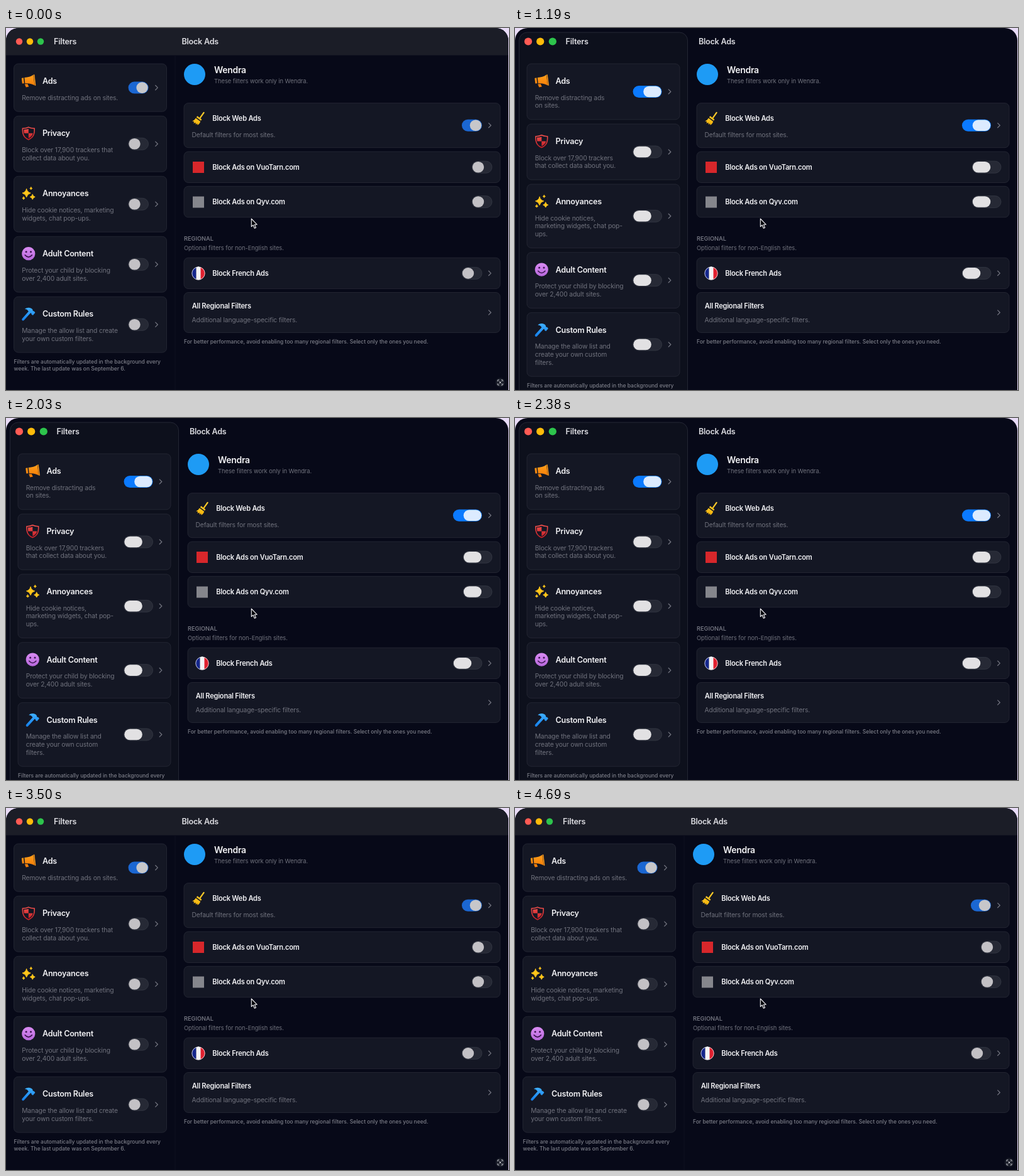
Recreate the animation shown at these times as an HTML page with a canvas. Size 800x577 px, loop 4760 ms.

```html
<!DOCTYPE html>
<html lang="en">
<head>
<meta charset="utf-8">
<title>Filters</title>
<style>
  html, body { margin: 0; width: 100%; height: 100%; overflow: hidden; background: #e9dcf8; }
  canvas { display: block; width: 800px; height: 577px; }
</style>
</head>
<body>
<canvas id="stage"></canvas>
<script>
const W = 800, H = 577, LOOP = 4760, NEW_FROM = 420, NEW_TO = 2800;
const canvas = document.getElementById('stage');
const ratio = window.devicePixelRatio || 1;
canvas.width = W * ratio;
canvas.height = H * ratio;
const ctx = canvas.getContext('2d');

// size, weight, letter spacing, colour
const STYLE = {
  title: [12.6, 600, -0.25, '#f0f0f3'],
  row: [11.1, 600, -0.25, '#f0f0f3'],
  app: [14, 600, -0.3, '#f0f0f3'],
  desc: [10.3, 400, -0.14, '#70727d'],
  small: [9.4, 400, -0.06, '#70727d'],
  note: [8.5, 500, 0, '#7c7e88'],
  label: [9.2, 600, 0, '#70727d']
};

// The same window in its older and its newer look
const OLD = {
  bg: '#070918', lights: [21, 38, 55], lightR: 5.2, filters: 76, heading: 279.5, headText: '#dcdce1',
  side: 12.5, main: 283, toggleW: 32, knobW: 18.4, sideToggle: 226.5,
  on: '#1b67d2', onKnob: '#c7c7ca', offKnob: '#c3c1c5',
  texts: [
    ['Remove distracting ads on sites.'],
    ['Block over 17,900 trackers that', 'collect data about you.'],
    ['Hide cookie notices, marketing', 'widgets, chat pop-ups.'],
    ['Protect your child by blocking', 'over 2,400 adult sites.'],
    ['Manage the allow list and create', 'your own custom filters.']
  ]
};
const NEW = {
  bg: '#070918', lights: [21, 40.2, 59.8], lightR: 6.1, filters: 80.5, heading: 292, headText: '#dcdce1',
  side: 19, main: 289, toggleW: 46, knobW: 28.5, sideToggle: 233.5,
  on: '#0b7aff', onKnob: '#dcebff', offKnob: '#e2e1e3',
  texts: [
    ['Remove distracting ads', 'on sites.'],
    ['Block over 17,900 trackers', 'that collect data about you.'],
    ['Hide cookie notices,', 'marketing widgets, chat pop-', 'ups.'],
    ['Protect your child by blocking', 'over 2,400 adult sites.'],
    ['Manage the allow list and', 'create your own custom', 'filters.']
  ]
};

function text(str, x, cy, style, color) {
  const [size, weight, spacing, ink] = STYLE[style];
  ctx.font = `${weight} ${size}px Inter, "Liberation Sans", sans-serif`;
  ctx.letterSpacing = spacing + 'px';
  ctx.fillStyle = color || ink;
  ctx.fillText(str, x, cy + size * 0.36);
}

function box(x, y, w, h, r, fill, stroke) {
  ctx.beginPath();
  ctx.roundRect(x, y, w, h, r);
  if (fill) { ctx.fillStyle = fill; ctx.fill(); }
  if (stroke) { ctx.strokeStyle = stroke; ctx.lineWidth = 0.8; ctx.stroke(); }
}

function disc(x, y, r, fill) {
  ctx.beginPath();
  ctx.arc(x, y, r, 0, Math.PI * 2);
  ctx.fillStyle = fill;
  ctx.fill();
}

function shape(d, fill, stroke, width = 1) {
  const path = new Path2D(d);
  if (fill) { ctx.fillStyle = fill; ctx.fill(path); }
  if (stroke) { ctx.strokeStyle = stroke; ctx.lineWidth = width; ctx.stroke(path); }
}

function at(x, y, draw) {
  ctx.save();
  ctx.translate(x, y);
  ctx.lineCap = ctx.lineJoin = 'round';
  draw();
  ctx.restore();
}

function shade(from, to) {
  const g = ctx.createLinearGradient(0, -10, 0, 10);
  g.addColorStop(0, from);
  g.addColorStop(1, to);
  return g;
}

const card = (x, y, w, h) => box(x, y, w, h, 7, '#141724', '#272a37');

function toggle(look, right, cy, on) {
  const w = look.toggleW, k = look.knobW, h = 19;
  const x = right - w;
  box(x, cy - h / 2, w, h, h / 2, on ? look.on : '#262935', on ? null : '#373a46');
  box(on ? right - k - 0.8 : x + 0.8, cy - 8.8, k, 17.6, 8.8, on ? look.onKnob : look.offKnob);
}

function chevron(x, cy) {
  at(x, cy, () => shape('M-1.8 -3.6L1.8 0L-1.8 3.6', null, '#70727d', 1.3));
}

function megaphone() {
  const c = shade('#ffa01c', '#f27805');
  shape('M-11 -4.5L-8 -5.2L-7 3.8L-10 4.2Z', c);
  shape('M-6.5 -5.5C-1 -5.8 4 -7 7.5 -10L9.8 7.2C6 4.8 1 3.5 -5.5 4Z', c);
  shape('M-6 5.2L-1.5 4.9L0.5 9.2L-4 10Z', c);
  shape('M8.8 -9.6L10.8 6.8', null, '#ff9a18', 1.5);
}

function shield() {
  const c = shade('#f0504c', '#c91f27');
  shape('M0 -7.2V0H-7.1C-7.4 -2 -7.4 -4 -7.3 -5.8C-4.5 -5.8 -2 -6.2 0 -7.2Z', c);
  shape('M0 0H7C6.2 3.8 3.5 6.3 0 8Z', c);
  shape('M0 -9.6C3 -8 6 -7.6 9.4 -7.7C9.8 1.5 7.6 7 0 10.2C-7.6 7 -9.8 1.5 -9.4 -7.7C-6 -7.6 -3 -8 0 -9.6Z', null, c, 1.6);
}

function star(x, y, r) {
  const q = r * 0.2;
  at(x, y, () => shape(
    `M0 ${-r}Q${q} ${-q} ${r} 0Q${q} ${q} 0 ${r}Q${-q} ${q} ${-r} 0Q${-q} ${-q} 0 ${-r}Z`,
    '#ffc61a', '#ffc61a', 1));
}

function sparkles() {
  star(-3.2, -0.6, 6.6);
  star(6.4, 5.6, 4);
  star(-7.8, 7.6, 2.1);
  star(4, -8, 2);
}

function smiley() {
  disc(0, 0, 10.6, shade('#d88af2', '#b869dc'));
  disc(-3.7, -3, 1.5, '#3b1550');
  disc(3.7, -3, 1.5, '#3b1550');
  shape('M-5.6 2.2Q0 8.6 5.6 2.2', null, '#3b1550', 1.6);
}

function hammer() {
  const c = shade('#3fb0ff', '#1580ea');
  shape('M-8.6 8.8L2 -3', null, c, 4);
  shape('M-6 -7.6C-2 -11 3.2 -10.8 6.4 -7.2L7 -4.6L9 -4.2L10.6 -2L7 2.2L4.8 0.8L4.4 -1.2L2 -1.8L-0.6 -4.8C-1.6 -6.6 -3.4 -7.4 -6 -7.6Z', c);
}

function broom() {
  const c = shade('#ffcf2e', '#f5b40c');
  shape('M8.6 -9.6L2.8 -1.4', null, c, 2.2);
  shape('M-1.6 -4.2L5.4 1.2L4 3.2L-3.2 -2.3Z', c);
  shape('M-4.2 -1L3.2 4.6C2.4 7.4 0.8 9.2 -1.4 10.2L-2 7.4L-4 9.4L-4.6 6.2L-7.4 7.6L-7 4.6L-9.8 4.2C-7.4 2.8 -5.4 1.2 -4.2 -1Z', c);
}

function flag() {
  ctx.save();
  ctx.beginPath();
  ctx.arc(0, 0, 10.5, 0, Math.PI * 2);
  ctx.clip();
  ['#14268c', '#f4f4f6', '#e0202f'].forEach((c, i) => {
    ctx.fillStyle = c;
    ctx.fillRect([-11, -3.5, 3.5][i], -11, 7.5, 22);
  });
  ctx.restore();
  box(-10.2, -10.2, 20.4, 20.4, 10.2, null, '#f4f4f6');
}

const square = (r, c) => () => { ctx.fillStyle = c; ctx.fillRect(-r, -r, 2 * r, 2 * r); };

const TOPICS = [
  ['Ads', megaphone], ['Privacy', shield], ['Annoyances', sparkles],
  ['Adult Content', smiley], ['Custom Rules', hammer]
];

function sidebar(look) {
  const x = look.side;
  let y = 57;
  TOPICS.forEach(([name, icon], i) => {
    const lines = look.texts[i], h = 63.5 + 12.7 * lines.length;
    card(x, y, 243, h);
    at(x + 23.3, y + 27.4, icon);
    text(name, x + 45.5, y + 27.6, 'title');
    lines.forEach((s, n) => text(s, x + 12.7, y + 53.8 + 12.7 * n, 'desc'));
    toggle(look, look.sideToggle, y + h / 2, i === 0);
    chevron(x + 227, y + h / 2);
    y += h + 7.1;
  });
  text('Filters are automatically updated in the background every', x, y + 7.6, 'note');
  text('week. The last update was on September 6.', x, y + 18.8, 'note');
}

function mainPane(look) {
  const x = look.main, w = 786 - x;
  disc(x + 17, 74, 17, '#1e9bf5');
  text('Wendra', x + 48, 67.3, 'app');
  text('These filters work only in Wendra.', x + 48, 84.5, 'small');

  const row = (name, y, h, cy, icon, right, on) => {
    card(x, y, w, h);
    if (icon) at(x + 23, cy, icon);
    text(name, x + (icon ? 45.3 : 12.7), cy, 'row');
    if (right) toggle(look, right, y + h / 2, on);
    if (right !== 773) chevron(769.5, y + h / 2);
  };
  row('Block Web Ads', 119.7, 71, 144.5, broom, 757, true);
  text('Default filters for most sites.', x + 12.5, 170.6, 'desc');
  row('Block Ads on VuoTarn.com', 197, 49.5, 222, square(9, '#d7272b'), 773, false);
  row('Block Ads on Qyv.com', 252.3, 49.5, 277.5, square(9, '#85868c'), 773, false);

  text('REGIONAL', x, 335.8, 'label');
  text('Optional filters for non-English sites.', x, 351, 'small');
  row('Block French Ads', 366.2, 49.4, 391, flag, 757, false);
  row('All Regional Filters', 421.5, 64, 442.8, null, 0, false);
  text('Additional language-specific filters.', x + 12.5, 465.2, 'desc');
  text('For better performance, avoid enabling too many regional filters. Select only the ones you need.', x, 500, 'note');
}

function cornerIcon() {
  box(-7.5, -7.5, 15, 15, 7.5, '#171a26');
  shape('M-4 -1.8V-4H-1.8M1.8 -4H4V-1.8M4 1.8V4H1.8M-1.8 4H-4V1.8M-1.6 -1.6L1.6 1.6M1.6 -1.6L-1.6 1.6', null, '#c9cad0', 1);
}

function render(look) {
  ctx.setTransform(ratio, 0, 0, ratio, 0, 0);
  ctx.fillStyle = '#e9dcf8';
  ctx.fillRect(0, 0, W, H);
  ctx.save();
  ctx.beginPath();
  ctx.roundRect(0, 0, 799, H + 1, [20, 20, 2, 2]);
  ctx.clip();
  ctx.fillStyle = look.bg;
  ctx.fillRect(0, 0, W, H);
  if (look === OLD) {
    ctx.fillStyle = '#1b1d27';
    ctx.fillRect(0, 0, W, 43.5);
    ctx.fillStyle = '#11131f';
    ctx.fillRect(268.5, 43.5, 1, H);
  } else {
    box(6.5, 7, 268, 590, 13, '#0d101c', '#2b2e3b');
  }

  ['#ff5b54', '#fdbb0a', '#2dc44c'].forEach((c, i) => disc(look.lights[i], 21.5, look.lightR, c));
  text('Filters', look.filters, 21.7, 'title', look.headText);
  text('Block Ads', look.heading, 21.7, 'title', look.headText);
  sidebar(look);
  mainPane(look);
  if (look === OLD) at(786, 565, cornerIcon);
  at(390.3, 304, () => shape('M0 0V12.6L2.9 10L5 15.2L7.2 14.3L5.1 9.3H9Z', '#05060c', '#f2f2f4', 1.1));
  ctx.restore();
}

function tick(now) {
  const t = now % LOOP;
  render(t >= NEW_FROM && t < NEW_TO ? NEW : OLD);
  requestAnimationFrame(tick);
}
render(OLD);
requestAnimationFrame(tick);
</script>
</body>
</html>
```
